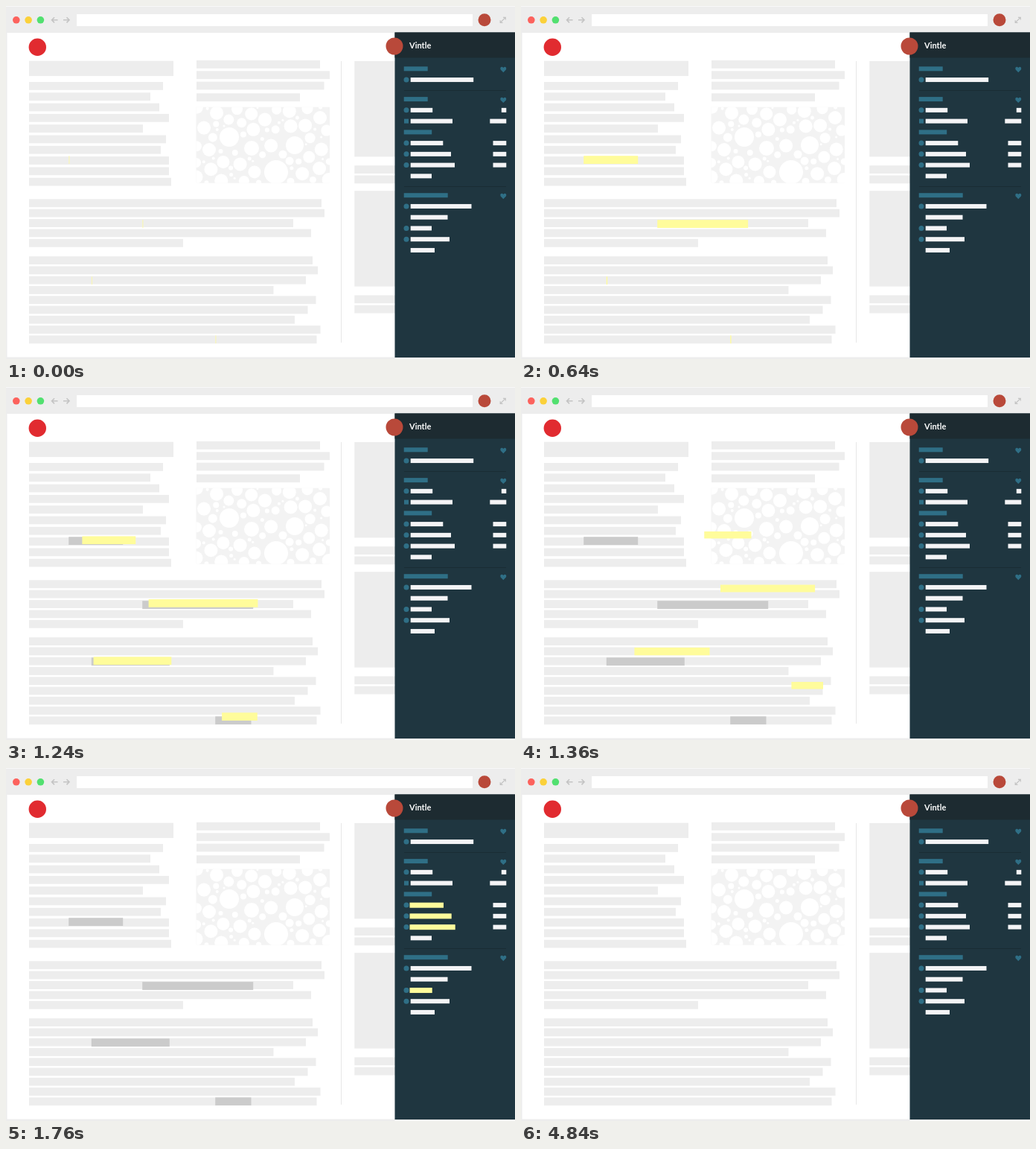
Write an HTML page that moves like this. It is 684 px wide and 474 px high and loops after 6200 ms.

```html
<!DOCTYPE html>
<html lang="en">
<head>
<meta charset="utf-8">
<title>Page highlights</title>
<style>
html, body { margin: 0; width: 100%; height: 100%; overflow: hidden; background: #ededed; }
svg { display: block; }
</style>
</head>
<body>
<svg id="stage" width="684" height="474" viewBox="0 0 684 474"></svg>
<script>
const LOOP = 6200, LANDED = 1760;
const PALE = '#ededed', ICON = '#c4c4c4', TEAL = '#2f6f86', BRAND = '#b9493a';
const LINE = 10.8, ROW = 6, ROW_STEP = 14.75;
const stage = document.getElementById('stage');

function set(el, attrs) {
  for (const k in attrs) el.setAttribute(k, attrs[k]);
  return el;
}
function add(tag, attrs, parent = stage) {
  const el = document.createElementNS('http://www.w3.org/2000/svg', tag);
  return parent.appendChild(set(el, attrs));
}
const box = (x, y, width, height, fill, parent) => add('rect', { x, y, width, height, fill }, parent);
const dot = (cx, cy, r, fill, parent) => add('circle', { cx, cy, r, fill }, parent);
const stroke = (d, width) => add('path', { d, stroke: ICON, 'stroke-width': width, fill: 'none' });

function drawBrowser() {
  box(0, 0, 684, 1, '#f8f8f8');
  box(1.5, 36, 681.5, 435.5, '#fff');
  box(95, 11, 532, 16, '#fff');
  ['#fc625d', '#fbd13a', '#52e070'].forEach((c, i) => dot(13.8 + i * 16.3, 18.8, 4.8, c));
  stroke('M69.5 18.8h-7.5m3 -3.6l-3.5 3.6l3.5 3.6', 1.6);
  stroke('M77 18.8h7.5m-3 -3.6l3.5 3.6l-3.5 3.6', 1.6);
  stroke('M664.5 22l6.5 -6.4m-3 -.3h3.3v3.2m-7.1 .8v3h3.3', 1.2);
  dot(643, 18.8, 8.5, BRAND);
  dot(42.3, 55.3, 11.7, '#e12b30');
}

function paragraph(x, top, step, widths) {
  widths.forEach((width, i) => box(x, top + i * step, width, LINE, PALE));
}

// A few large bubbles, then ever smaller ones wherever they still fit
function drawBubbles() {
  const [x0, y0, w, h] = [255.5, 135.7, 179.5, 102];
  box(x0, y0, w, h, '#f3f3f3', add('g', {}));
  const clip = add('clipPath', { id: 'picture' });
  box(x0, y0, w, h, '#000', clip);
  const group = add('g', { 'clip-path': 'url(#picture)' });
  const bubbles = [
    [363, 223, 16], [300, 176, 13], [388, 187, 12], [330, 191, 10], [273, 193, 9], [422, 150, 9]
  ];
  let seed = 7;
  const random = () => (seed = seed * 16807 % 2147483647) / 2147483647;
  for (let r = 9; r >= 1.5; r -= 0.5) {
    for (let i = 0; i < 90; i++) {
      const x = x0 + random() * w, y = y0 + random() * h;
      if (bubbles.every(b => Math.hypot(x - b[0], y - b[1]) > b[2] + r + 1.5)) bubbles.push([x, y, r]);
    }
  }
  bubbles.forEach(([x, y, r]) => dot(x, y, r, '#fff', group));
}

function drawPage() {
  box(31, 73.7, 194, 20.3, PALE);
  paragraph(31, 102, 14.3, [180, 163, 175, 188, 153, 184, 177, 188, 188, 191]);
  paragraph(256, 73, 14.3, [166, 179, 171.5]);
  paragraph(256, 117.3, 0, [139]);
  paragraph(31, 259.3, 13.4, [393, 397, 355, 379, 207]);
  paragraph(31, 336.2, 13.28, [381, 388, 372, 328.5, 385.5, 374.5, 357, 391.5, 386.5]);
  drawBubbles();
  box(450, 74, 1, 378, '#e6e6e6');
  for (const top of [74, 248.2]) {
    box(468.3, top, 55, 128.4, PALE);
    paragraph(468.3, top + 140.2, 13.3, [55, 55]);
  }
}

// Sidebar content flows down from a cursor
let cursor = 0;
const rows = [];

function heading(width, favourite) {
  box(534.7, cursor - 3, width, ROW, TEAL);
  if (favourite) {
    add('path', {
      d: `M668.3 ${cursor + 5}l-3.6 -3.7c-1.6 -3.6 2 -5 3.6 -2.5c1.6 -2.5 5.2 -1.1 3.6 2.5z`,
      fill: TEAL
    });
  }
}

function row(width, value = 0, bullet = 'round') {
  cursor += ROW_STEP;
  box(543.7, cursor - 3, width, ROW, '#f4f4f6');
  if (value) box(672.3 - value, cursor - 3, value, ROW, '#f4f4f6');
  if (bullet === 'round') dot(538, cursor, 3.5, TEAL);
  if (bullet === 'square') box(535, cursor - 3, ROW, ROW, TEAL);
  rows.push({ y: cursor, width });
}

function drawSidebar() {
  box(522.5, 35.5, 161.5, 436.5, '#1f3640');
  box(522.5, 35.5, 161.5, 34, '#1d2b31');
  dot(522, 54, 11.5, BRAND);
  add('text', {
    x: 542, y: 57, fill: '#fff', 'font-size': 11, 'font-weight': 700,
    'font-family': 'Lato, "Open Sans", sans-serif'
  }).textContent = 'Vintle';

  cursor = 84.3;
  heading(32, true);
  row(84.5);

  cursor = 125.1;
  box(535, 113, 137, 1, '#1a2d34');
  heading(32, true);
  row(29.5, 6.5);
  row(56.3, 22, 'square');
  cursor += ROW_STEP;
  heading(37.5, false);
  row(43.6, 17.8);
  row(54.3, 17.8);
  row(59.3, 17.8);
  row(28.3, 0, 'none');

  cursor = 254.2;
  box(535, 242, 137, 1, '#1a2d34');
  heading(59, true);
  row(81.8);
  row(49.8, 0, 'none');
  row(28.3);
  row(52.3);
  row(32.3, 0, 'none');
}

drawBrowser();
drawPage();
drawSidebar();

// Each mark is drawn on the page, then flies onto a sidebar row
const marks = [
  { x: 84.2, y: 201.2, width: 73, row: 3, start: 1000 },
  { x: 183.2, y: 287.2, width: 149, row: 4, start: 1040 },
  { x: 114.8, y: 363.3, width: 105, row: 5, start: 1122 },
  { x: 281.2, y: 442.3, width: 48.3, row: 9, start: 1012 }
];
let total = 0;
for (const m of marks) {
  const { y, width } = rows[m.row];
  m.from = { x: m.x, y: m.y, width: m.width, height: LINE };
  m.to = { x: 542.5, y: y - 3.4, width: width + 1.9, height: 7 };
  m.before = total;
  total += m.width;
  m.shade = add('rect', { ...m.from, fill: '#cbcbcb' });
}
for (const m of marks) m.pen = add('rect', { fill: '#fffc9b' });

const clamp = v => Math.min(1, Math.max(0, v));
const expoInOut = p => p <= 0 ? 0 : p >= 1 ? 1 :
  p < 0.5 ? 2 ** (20 * p - 11) : 1 - 2 ** (9 - 20 * p);

function draw(t) {
  const inked = total * clamp((t - 400) / 464);
  const fade = 1 - clamp((t - 4270) / 570);
  const caret = 0.6 + 0.4 * clamp(t / 280);
  for (const m of marks) {
    const move = expoInOut((t - m.start) / (LANDED - m.start));
    const pose = {};
    for (const k in m.from) pose[k] = m.from[k] + (m.to[k] - m.from[k]) * move;
    // A thin caret waits where each stroke will begin
    if (t < m.start) pose.width = Math.min(m.width, Math.max(1.3, inked - m.before));
    set(m.pen, { ...pose, opacity: caret * fade });
    set(m.shade, { opacity: t >= 1000 ? fade : 0 });
  }
}

const began = performance.now();
function tick() {
  draw((performance.now() - began) % LOOP);
  requestAnimationFrame(tick);
}
draw(0);
requestAnimationFrame(tick);
</script>
</body>
</html>
```
